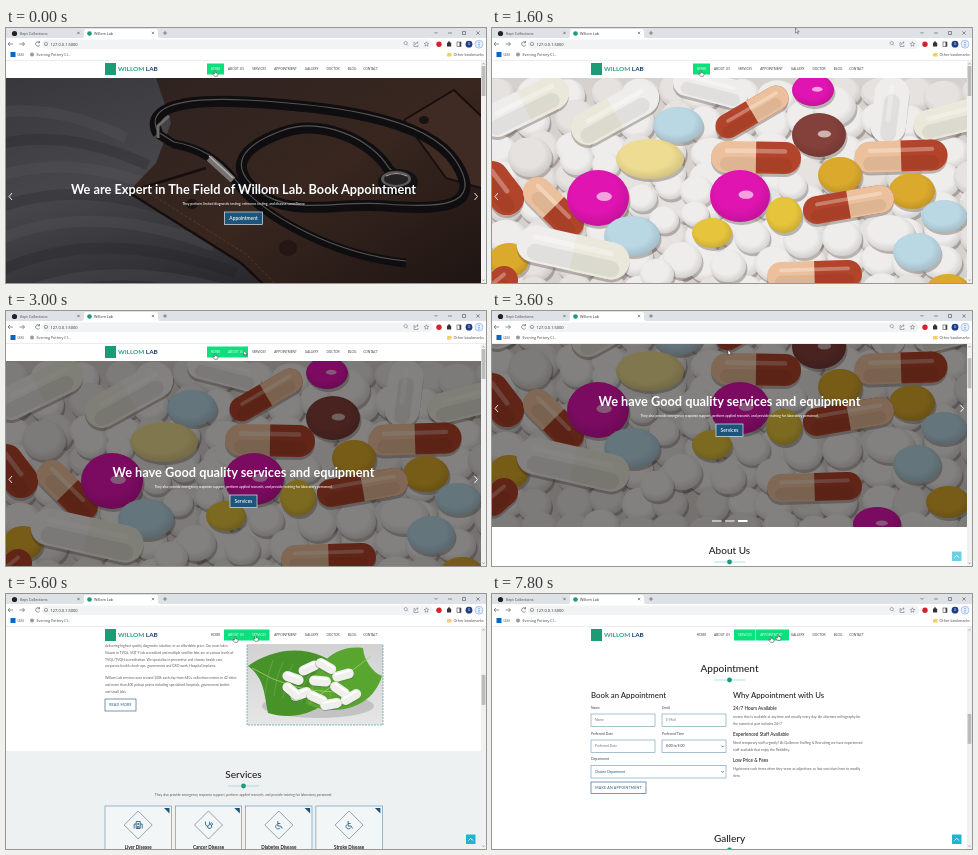
An HTML page that plays this animation: 480x255 px, repeating every 8000 ms.

```html
<!DOCTYPE html>
<html lang="en">
<head>
<meta charset="utf-8">
<style>
html, body { margin: 0; width: 100%; height: 100%; overflow: hidden; background: #fff; }
svg { display: block; width: 100vw; height: 100vh; }
text { font-family: Lato, sans-serif; white-space: pre; }
.ui { font-family: "Open Sans", sans-serif; }
</style>
</head>
<body>
<svg id="stage" viewBox="0 0 480 255" preserveAspectRatio="none"></svg>
<script>
const NAVY = '#1b557c', GREEN = '#0be07c', LOGO = '#1d9b76', INK = '#222', GREY = '#5c5c5c';

// y is the vertical middle of the capitals
const text = (x, y, s, size, fill = GREY, extra = '') =>
  `<text x="${x}" y="${y + size * .35}" font-size="${size}" fill="${fill}" ${extra}>${s}</text>`;
const mid = (x, y, s, size, fill, extra = '') => text(x, y, s, size, fill, 'text-anchor="middle" ' + extra);
const rect = (x, y, w, h, fill, extra = '') =>
  `<rect x="${x}" y="${y}" width="${w}" height="${h}" fill="${fill}" ${extra}/>`;
const oval = (x, y, rx, ry, fill, extra = '') =>
  `<ellipse cx="${x}" cy="${y}" rx="${rx}" ry="${ry}" fill="${fill}" ${extra}/>`;
const line = (d, color, w = .6, extra = '') =>
  `<path d="${d}" fill="none" stroke="${color}" stroke-width="${w}" ${extra}/>`;
const shape = (d, fill) => `<path d="${d}" fill="${fill}"/>`;
const group = (id, s, extra = '') => `<g id="${id}" ${extra}>${s}</g>`;
const lines = (x, y, step, list) => list.map((s, i) => text(x, y + i * step, s, 3.4)).join('');
const outline = (x, y, w, h) => rect(x, y, w, h, '#fff', `stroke="${NAVY}" stroke-width=".6"`);
const bold = 'font-weight="700"', medium = 'font-weight="500"', ui = 'class="ui"';

function tablet(x, y, rx, ry, color) {
  return oval(x + 1.5, y + 3, rx, ry, '#504640', 'opacity=".35"') + oval(x, y, rx, ry, color) +
    oval(x, y, rx, ry, 'url(#shade)');
}
const glossy = (x, y, rx, ry, color) =>
  tablet(x, y, rx, ry, color) + oval(x + rx * .2, y - ry * .05, rx * .25, ry * .16, '#fff', 'opacity=".6"');

function capsule(x1, y1, x2, y2, w, a, b) {
  const round = 'stroke-linecap="round"', mx = (x1 + x2) / 2, my = (y1 + y2) / 2;
  const full = (dy, color, width, o = 1) =>
    line(`M${x1} ${y1 + dy}L${x2} ${y2 + dy}`, color, width, `${round} opacity="${o}"`);
  return full(3, '#504640', w, .35) + full(0, a, w) +
    line(`M${mx} ${my}L${x2} ${y2}`, b, w) + oval(x2, y2, w / 2, w / 2, b) +
    full(w * .22, '#000', w * .45, .06) + full(-w * .2, '#fff', w * .14, .3);
}

function pills() {
  const white = '#efedeb', pale = '#e6e2df', cream = '#e9e8db', blue = '#bad7e4', gold = '#dba92c',
    yellow = '#e6c43c', pink = '#e014b0', rust = '#b2442b', tan = '#ecc09c';
  let seed = 11, s = rect(0, 50, 475, 237, '#d6d1cd');
  const rnd = () => (seed = seed * 16807 % 2147483647) / 2147483647;
  for (let y = 62; y < 300; y += 28)
    for (let x = 5; x < 490; x += 34)
      s += tablet(x + rnd() * 12, y + rnd() * 8, 17 + rnd() * 4, 15 + rnd() * 4, rnd() < .6 ? white : pale);
  const rounds = [[85, 132, 17], [114, 137, 14], [150, 170, 15], [178, 158, 15], [205, 163, 17], [172, 192, 15],
    [203, 186, 14], [260, 209, 18], [283, 236, 20], [311, 212, 20], [350, 210, 20], [236, 238, 18], [190, 232, 20],
    [165, 246, 17], [342, 78, 22], [300, 158, 15]];
  for (const [x, y, r] of rounds) s += tablet(x, y, r, r * .9, white);
  return s + capsule(5, 92, 60, 65, 34, white, cream) + capsule(96, 100, 150, 70, 34, cream, white) +
    capsule(195, 54, 242, 66, 28, white, white) + tablet(186, 97, 25, 18, blue) +
    capsule(236, 98, 284, 70, 25, rust, tan) + glossy(321, 62, 21, 16, pink) +
    glossy(327, 107, 27, 22, '#84403a') + capsule(400, 66, 396, 98, 35, white, white) +
    capsule(437, 97, 480, 86, 31, cream, cream) + capsule(235, 129, 293, 130, 32, tan, rust) +
    capsule(378, 129, 440, 127, 31, tan, rust) + tablet(38, 129, 22, 20, pale) +
    capsule(0, 150, 15, 170, 34, rust, rust) + capsule(46, 164, 77, 195, 30, tan, rust) +
    tablet(158, 131, 34, 20, '#eedc92') + tablet(348, 147, 22, 18, gold) + tablet(420, 163, 23, 18, gold) +
    glossy(106, 170, 31, 28, pink) + glossy(248, 168, 30, 26, pink) +
    capsule(325, 182, 388, 171, 28, rust, tan) + tablet(292, 187, 18, 18, yellow) +
    tablet(220, 205, 20, 15, yellow) + tablet(140, 208, 28, 20, blue) + tablet(452, 188, 23, 16, blue) +
    tablet(398, 205, 25, 18, white) + tablet(425, 224, 24, 19, blue) + tablet(17, 232, 20, 17, gold) +
    capsule(12, 252, 0, 262, 28, rust, rust) + capsule(43, 216, 119, 233, 37, white, cream) +
    capsule(289, 248, 356, 246, 28, tan, rust) + tablet(456, 262, 22, 16, gold) + glossy(385, 284, 24, 17, pink);
}

function stethoscope() {
  const loop = 'M152 106C140 84 165 70 240 74S420 88 450 135S430 182 380 178S285 190 253 165S235 120 275 105S365 112 383 142L405 160';
  const stem = 'M152 106L168 116Q205 122 228 152T300 206T400 235';
  const tube = (d, w) => line(d, '#0e0d0f', w) + line(d, '#56524f', 1.2, 'transform="translate(0 -2)"');
  let folds = '';
  for (let i = 0; i < 7; i++)
    folds += line(`M-10 ${85 + i * 32}Q${50 + i * 8} ${75 + i * 24} ${120 + i * 22} ${110 + i * 27}`,
      i % 2 ? '#1c1c20' : '#5c5c60', 11, 'opacity=".25"');
  return rect(0, 50, 475, 237, 'url(#cloth)') + folds +
    shape('M150 50H475V287H290L235 235L122 164L150 135L165 95z', 'url(#leather)') +
    line('M290 287L235 235L122 164L200 140', '#150e0d', 2.5) +
    line('M300 287L240 226L140 163', '#6a4a3c', .5, 'stroke-dasharray="3 2"') +
    shape('M398 92L448 62L475 88V160L440 150z', '#402b24') +
    line('M398 92L448 62L475 88M398 92L440 150L475 160', '#170f0e', 2) +
    oval(418, 92, 5, 4, '#181211') + oval(282, 220, 9, 8, '#251614') + oval(186, 176, 6, 5, '#1c1211') +
    tube(stem, 9) + tube(loop, 11) +
    line('M203 130L227 152', '#777371', 7) + line('M203 128L227 150', '#b5b0ad', 1.3) +
    line('M152 110V98L163 88', '#6d6967', 3) +
    oval(392, 154, 20, 13, '#131214') + oval(390, 151, 15, 8, '#5d5957') + oval(390, 151, 12, 6, '#252224') +
    line('M380 148Q390 143 401 148', '#a8a29e', 1.2);
}

const caption = (title, sub, label, w) =>
  mid(237.5, 161.7, title, 12.75, '#fff', bold) + mid(237.5, 176.3, sub, 3.4, '#fff', medium) +
  rect(237.5 - w / 2, 184, w, 12.5, NAVY, 'stroke="#dce6ec" stroke-width=".7"') + mid(237.5, 190.2, label, 4.9, '#fff', medium);

const heading = (y, s) => mid(237.5, y, s, 10, INK, medium) +
  line(`M222 ${y + 12}H253`, '#7fcfd0', .6) + oval(237.5, y + 12, 2.4, 2.4, LOGO);

const SUPPORT = 'They also provide emergency response support, perform applied research, and provide training for laboratory personnel.';

function hero() {
  const arrows = line('M6 165L3 168.5L6 172M468.5 165L471.5 168.5L468.5 172', '#fff', .9);
  const bars = [220, 233, 246].map((x, i) => rect(x, 280, 9.5, 2, '#fff', `opacity="${i == 2 ? 1 : .5}"`)).join('');
  return rect(0, 50, 475, 237, '#fff') + group('first', stethoscope()) +
    group('opening', caption('We are Expert in The Field of Willom Lab. Book Appointment',
      'They perform limited diagnostic testing, reference testing, and disease surveillance', 'Appointment', 38)) +
    group('second', pills() + group('shadow', rect(0, 50, 475, 237, '#000', 'opacity=".46"')), 'clip-path="url(#slide)"') +
    group('caption', caption('We have Good quality services and equipment', SUPPORT, 'Services', 27)) + arrows + bars;
}

function about() {
  let s = heading(310, 'About Us') + text(99, 350, 'We provide trusted diagnostic care', 6.5, INK, medium) +
    lines(99, 368.6, 6.7, ['Our laboratory works with doctors and patients alike and is dedicated to',
      'better testing for every family, with a team that is known for',
      'delivering highest quality diagnostic solution, at an affordable price. Our main lab is',
      'Situate in TVQL. VQT 9 lab accredited and multiple satellite labs are at various levels of',
      'TVQL/TVQH accreditation. We specialise in preventive and chronic health care,',
      'corporate health check-ups, government and CRO work, Hospital Implants.']) +
    lines(99, 414, 6.9, ['Willom Lab services over around 100k each day from 640+ collection centres in 42 cities',
      'and more than 400 pickup points including specialised hospitals, government bodies', 'and small labs.']) +
    outline(99, 435, 31, 12) + mid(114.5, 441, 'READ MORE', 3.5, NAVY, 'letter-spacing=".25"');
  s += rect(241, 343, 136, 118, 'url(#paper)') +
    oval(312, 442, 56, 12, '#777', 'opacity=".3"') +
    shape('M242 402C270 382 310 378 342 410C330 440 296 460 262 449C258 428 258 414 242 402z', '#479329') +
    shape('M300 440C305 405 325 380 357 384C358 396 366 408 376 412C367 443 332 454 300 440z', '#58a52f') +
    line('M246 404Q285 428 330 428M365 392Q335 415 305 438', '#a4cf70', .8);
  for (let i = 0; i < 8; i++)
    s += line(`M${262 + i * 9} ${412 + i * 2}l${5 + i} -16m${-5 - i} 16l-3 18`, '#8ec05b', .4);
  const heap = [[287, 414, 20], [303, 404, -25], [320, 402, 30], [337, 411, -15], [295, 430, -20], [314, 417, 5],
    [334, 426, 35], [345, 433, -30], [311, 434, 25], [325, 440, -10], [286, 427, 40]];
  for (const [x, y, a] of heap)
    s += `<g transform="translate(${x} ${y}) rotate(${a})">${rect(-11, -4, 22, 10, '#56644a', 'rx="5" opacity=".4"')}` +
      rect(-11, -5, 22, 10, '#efefec', 'rx="5"') + rect(-8, -3.5, 16, 2, '#fff', 'rx="1"') + '</g>';
  return s + rect(241, 343, 136, 118, 'none', 'stroke="#4a9fa8" stroke-width=".7" stroke-dasharray="2 1"');
}

function services() {
  const wheelchair = 'M-1 -4V1H2L3.5 3.5M-1 -1.5H1.5M-2 -.5A2.4 2.4 0 1 0 1.5 2.5';
  const icons = ['M-2 3.5V-3.5H2V3.5zM-4 3.5V-1H-2M2 -1H4V3.5M-1 -1H1M0 -2V0M-.8 3.5V1.5H.8V3.5',
    'M-3 -3.5V-1Q-3 1 -1 1T1 -1V-3.5M-1 1Q-1 4 1.5 3.5T3 0M3 0a1 1 0 1 1 .1 0', wheelchair, wheelchair];
  let s = rect(0, 487, 475, 192, '#eef1f2') + heading(510, 'Services') + mid(237.5, 531.3, SUPPORT, 3.4, GREY);
  ['Liver', 'Cancer', 'Diabetes', 'Stroke'].forEach((name, i) => {
    const x = 99 + i * 70.3, c = x + 33.2;
    s += rect(x, 542, 66.4, 106, '#f3f6f7', 'stroke="#5c8ba8" stroke-width=".6"') +
      shape(`M${x + 59} 544h5.5v5.5z`, NAVY) +
      line(`M${c} 547l14 14l-14 14l-14 -14z`, '#54687a', .6) +
      line(icons[i], NAVY, .8, `transform="translate(${c} 561)"`) +
      mid(c, 583, name + ' Disease', 4.6, INK, bold);
    ['We offer early testing and', 'careful follow-up for all', 'of our patients.']
      .forEach((row, k) => s += mid(c, 595 + k * 6.7, row, 3.4, GREY));
  });
  return s;
}

function appointment() {
  const field = (x, y, w, label, value, select, color = '#777') =>
    text(x, y - 6.3, label, 3.4, '#444') + rect(x, y, w, 12.5, '#fff', 'stroke="#6a9ab5" stroke-width=".6"') +
    text(x + 4, y + 6.3, value, 3.4, color) +
    (select ? line(`M${x + w - 4.5} ${y + 5.7}l1.2 1.2l1.2 -1.2`, INK, .6) : '');
  const reason = (y, title, rows) => text(241, y, title, 4.7, INK, medium) + lines(241, y + 9, 6.5, rows);
  return rect(0, 679, 475, 220, '#fff') + heading(704, 'Appointment') +
    text(99, 731, 'Book an Appointment', 7.8, INK, medium) +
    text(241, 731, 'Why Appointment with Us', 7.8, INK, medium) +
    field(99, 750, 64, 'Name', 'Name') + field(170, 750, 64, 'Email', 'E-Mail') +
    field(99, 776, 64, 'Preferred Date', 'Preferred Date') +
    field(170, 776, 64, 'Preferred Time', '8:00 to 9:00', true, '#333') +
    field(99, 801.5, 135, 'Department', 'Choose Department', true, NAVY) +
    outline(99, 818, 55, 11.5) + mid(126.5, 823.8, 'MAKE AN APPOINTMENT', 3.5, NAVY, 'letter-spacing=".25"') +
    reason(744, '24/7 Hours Available', ['review that is available at any time and usually every day. An alternate orthography for',
      'the numerical part includes 24×7']) +
    reason(770, 'Experienced Staff Available', ['Need temporary staff urgently? At Quillmere Staffing &amp; Recruiting we have experienced',
      'staff available that enjoy the flexibility.']) +
    reason(796, 'Low Price &amp; Fees', ['Hyphenate such items when they serve as adjectives: as low-cost does here to modify', 'item.']) +
    heading(874, 'Gallery');
}

// label, centre, box left, box right
const NAV = [['HOME', 209.5, 201, 218], ['ABOUT US', 230, 218, 242], ['SERVICES', 253, 242, 263.5],
  ['APPOINTMENT', 279.5, 264, 297], ['GALLERY', 305.5], ['DOCTOR', 327], ['BLOG', 346], ['CONTACT', 364.5]];

function header() {
  return rect(0, 33, 475, 17, '#fff') + rect(99, 35, 11, 12, LOGO) +
    `<text x="112" y="43.4" font-size="6.4" font-weight="700" fill="#25a47f">WILLOM <tspan fill="#173f6b">LAB</tspan></text>` +
    NAV.map(([s, c, a, b], i) => (a ? rect(a, 35.5, b - a, 11, GREEN, `id="box${i}"`) : '') +
      mid(c, 41, s, 3.25, '#333', `class="ui" id="nav${i}"`)).join('');
}

function chrome() {
  const icon = '#5f6368';
  const cross = (x, y, r) => `M${x - r} ${y - r}l${2 * r} ${2 * r}m0 ${-2 * r}l${-2 * r} ${2 * r}`;
  return rect(0, 0, 480, 33, '#fff') + rect(0, 0, 480, 10, '#dee1e6') +
    shape('M76 10Q78 10 78 8V3Q78 1 80 1H150Q152 1 152 3V8Q152 10 154 10z', '#fff') +
    oval(8.5, 5.5, 2.6, 2.6, '#222') + text(14, 5.5, 'Kept Collections', 3.7, '#444', ui) +
    oval(83.5, 5.5, 2.3, 2.3, LOGO) + text(88, 5.5, 'Willom Lab', 3.7, '#333', ui) +
    line(cross(72.5, 5, 1.2) + cross(147, 5, 1.2) + 'M157 5h4m-2 -2v4M428.5 4l1.5 1.5l1.5 -1.5M442 5h4M456.5 3.5h3v3h-3z' + cross(472, 5, 1.6), '#333', .5) +
    line('M7.5 16h-5m2 -2l-2 2l2 2M14 16h5m-2 -2l2 2l-2 2M34 14.5a2.2 2.2 0 1 0 .2 2.5m-.2 -4v1.8h-1.8', icon, .7, 'transform="translate(-.5 0)"') +
    rect(36, 11.5, 391, 9.5, '#f1f3f4', 'rx="4.7"') + line('M38.3 16a1.7 1.7 0 1 0 3.4 0a1.7 1.7 0 1 0 -3.4 0M40 16v1', icon, .5) +
    text(44.5, 16.3, '127.0.0.1:5000', 4, '#333', ui) +
    line('M402 17.5l-1.2 -1.2a1.6 1.6 0 1 1 .1 -.1M409 14.5h-1v4h4v-1.5M409 17q0 -2.5 3 -2.5m-1 -1l1.2 1l-1.2 1', icon, .5) +
    line('M420.5 13.8l.7 1.5l1.6 .2l-1.2 1.1l.3 1.6l-1.4 -.8l-1.4 .8l.3 -1.6l-1.2 -1.1l1.6 -.2z', icon, .5) +
    oval(433, 16.2, 2.7, 2.7, '#d3222a') + rect(441, 14.5, 4.2, 4, '#333', 'rx=".6"') + oval(443, 14.2, 1, 1, '#333') +
    rect(451, 14, 4, 4.5, 'none', 'stroke="#444" stroke-width=".6"') + rect(453.5, 14, 1.5, 4.5, '#444') +
    oval(463, 16.2, 3.4, 3.4, '#1f3b85') + mid(463, 16.2, 'G', 3.6, '#fff', ui) +
    oval(473, 16.2, 4, 4, '#e8f0fe', 'stroke="#7ea6ea" stroke-width=".6"') +
    [14.3, 16.2, 18.1].map(y => oval(473, y, .5, .5, '#1a57c9')).join('') +
    rect(4.5, 24, 5, 5, '#0a66c2') + text(11.5, 26.5, '(46)', 3.7, '#444', ui) +
    oval(26, 26.5, 2, 2, '#999') + text(30.5, 26.5, 'Evening Pottery Cl...', 3.7, '#444', ui) +
    rect(441, 25, 4.5, 3.5, '#f5cf62', 'rx=".4"') + text(447.5, 26.5, 'Other bookmarks', 3.7, '#444', ui) +
    rect(0, 32.3, 480, .5, '#d9dbde');
}

const grad = (id, kind, stops, extra = '') => `<${kind} id="${id}" ${extra}>` +
  stops.map(([o, c, a = 1]) => `<stop offset="${o}" stop-color="${c}" stop-opacity="${a}"/>`).join('') + `</${kind}>`;
const clip = (id, y, h) => `<clipPath id="${id}">${rect(0, y, 475, h, '#fff')}</clipPath>`;

const hand = '<path d="M-.6 -2.5Q0 -3.3 .6 -2.5V-.3L2.6 .2Q3.2 .5 3 1.5L2.4 3.3H-.6L-2.4 .9Q-2.3 0 -.6 1z" fill="#fff" stroke="#222" stroke-width=".45"/>';
const arrow = '<path d="M0 0V5L1.2 3.9L2 5.7L2.8 5.3L2 3.6H3.6z" fill="#fff" stroke="#222" stroke-width=".45"/>';

document.getElementById('stage').innerHTML = '<defs>' +
  grad('shade', 'radialGradient', [[.6, '#000', 0], [1, '#000', .13]], 'cx=".45" cy=".4" r=".62"') +
  grad('leather', 'linearGradient', [[0, '#2e2321'], [.5, '#38261f'], [1, '#1d1412']], 'x2=".9" y2="1"') +
  grad('cloth', 'linearGradient', [[0, '#38383c'], [.4, '#47474b'], [1, '#202024']], 'x2=".6" y2="1"') +
  grad('paper', 'linearGradient', [[0, '#c9c9cb'], [1, '#e6e6e6']], 'x2="0" y2="1"') +
  clip('view', 33, 222) + clip('slide', 50, 237) + '</defs>' +
  rect(0, 0, 480, 255, '#fff') +
  `<g clip-path="url(#view)">${group('page', hero() + about() + services() + appointment())}${group('header', header())}</g>` +
  group('top', rect(460, 240.5, 9.5, 9.5, '#20b3d3', 'rx=".6"') + line('M462.5 246.5l2.2 -2.2l2.2 2.2', '#fff', 1)) +
  rect(475, 33, 5, 222, '#f1f1f1') + line('M476.3 36.5l1.2 -1.3l1.2 1.3M476.3 251.5l1.2 1.3l1.2 -1.3', '#777', .6) +
  rect(475.6, 38, 3.8, 30, '#bcbcbc', 'id="thumb"') +
  chrome() + group('trail', hand) + group('hand', hand) + group('arrow', arrow);

const $ = id => document.getElementById(id);
const clamp = v => Math.max(0, Math.min(1, v));
const set = (id, name, value) => $(id).setAttribute(name, value);
const move = (id, x, y) => set(id, 'transform', `translate(${x} ${y})`);

const SCROLL = [[3400, 0], [3600, 71], [4000, 238], [5400, 238], [5600, 330], [6000, 437], [7200, 437], [7600, 630]];
const POINTER = [[1400, 310, -8], [1600, 303.5, 0], [2400, 255, 35], [3200, 232, 41], [3600, 236, 39],
  [5000, 240, 43], [5400, 249, 44], [6400, 252, 44], [7200, 279, 44], [7800, 286, 43]];
const ACTIVE = [[0, [0]], [3000, [0, 1]], [3600, [1]], [5200, [1, 2]], [6000, [2]], [6800, [2, 3]]];
const TRAIL = [[0, 209], [3400, 229], [7200, 279]];

function track(keys, t, col = 1) {
  const i = keys.findIndex(k => k[0] > t);
  if (i == 0) return keys[0][col];
  if (i < 0) return keys[keys.length - 1][col];
  const a = keys[i - 1], b = keys[i];
  return a[col] + (b[col] - a[col]) * (t - a[0]) / (b[0] - a[0]);
}
const held = (keys, t) => keys.filter(k => k[0] <= t).pop()[1];

function draw(t) {
  const scroll = track(SCROLL, t), fade = clamp((t - 400) / 500), rise = clamp((t - 1700) / 600);
  const pinned = scroll == 0 || scroll > 120;
  move('page', 0, -scroll);
  move('header', 0, pinned ? 0 : -scroll);
  move('thumb', 0, scroll * .13);
  set('top', 'opacity', clamp((scroll - 20) / 80));
  set('first', 'opacity', 1 - fade);
  set('opening', 'opacity', clamp(1 - 2 * fade));
  set('second', 'opacity', fade);
  set('shadow', 'opacity', rise);
  set('caption', 'opacity', rise);
  move('caption', 0, 12 * (1 - rise) ** 2);

  const active = held(ACTIVE, t);
  NAV.forEach((item, i) => {
    const on = active.includes(i);
    if (item[2]) set('box' + i, 'opacity', +on);
    set('nav' + i, 'fill', on ? '#fff' : '#333');
  });

  const x = track(POINTER, t), y = track(POINTER, t, 2), pointing = t >= 4000;
  move('trail', held(TRAIL, t), 45);
  set('trail', 'opacity', +pinned);
  move('hand', x, y);
  move('arrow', x, y);
  set('hand', 'opacity', +pointing);
  set('arrow', 'opacity', +!pointing);
}

const LOOP = 8000, STEP = 200, start = performance.now();
function tick() {
  const t = (performance.now() - start) % LOOP;
  draw(Math.floor(t / STEP) * STEP);
  requestAnimationFrame(tick);
}
tick();
</script>
</body>
</html>
```
